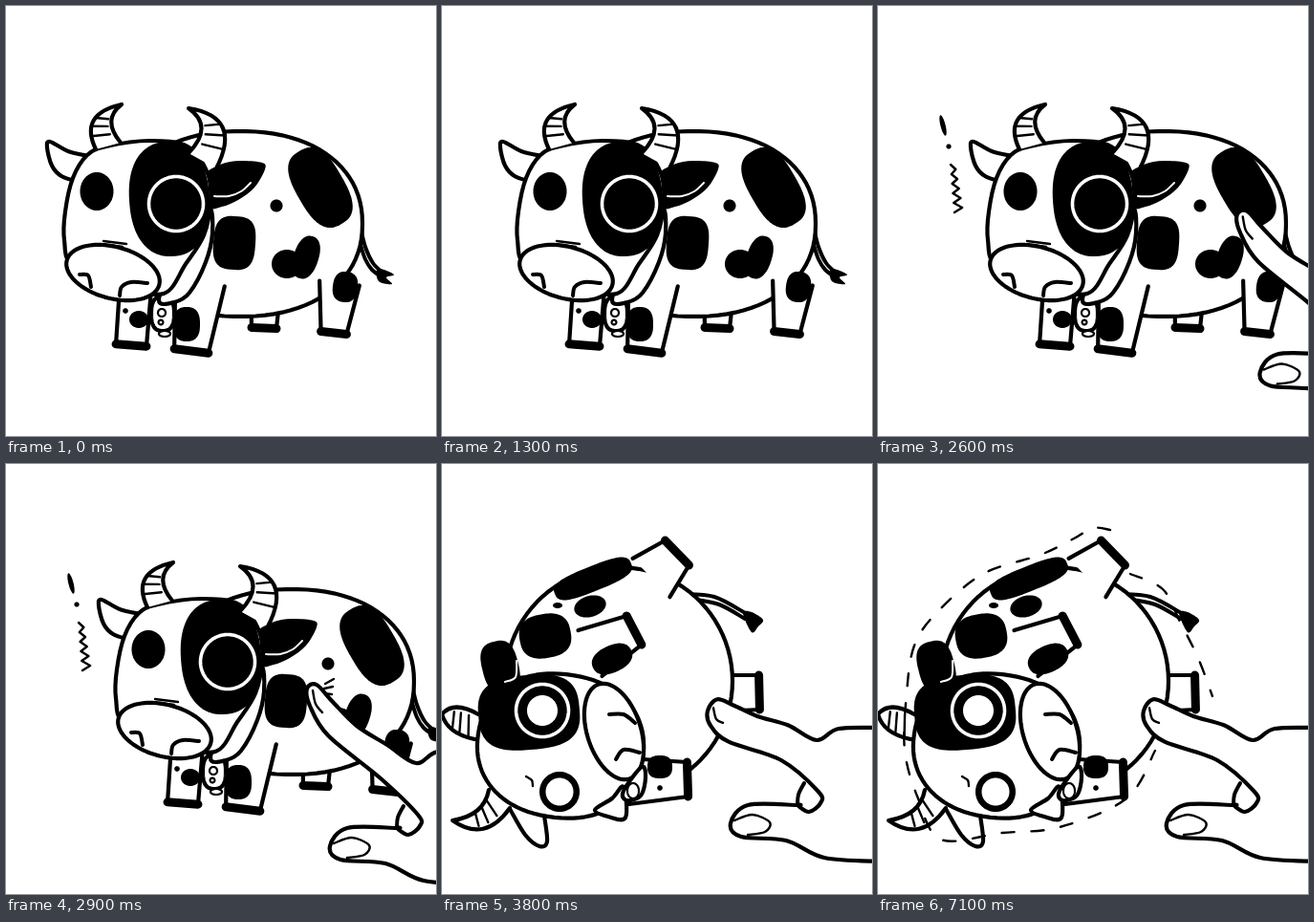
An HTML page with a canvas for the animation above (8000 ms loop, 450x450 px).

```html
<!DOCTYPE html>
<html lang="en">
<head>
<meta charset="utf-8">
<title>Cow poke</title>
<style>
html, body { margin: 0; width: 100%; height: 100%; overflow: hidden; background: #fff; }
canvas { display: block; width: 100vw; height: 100vh; }
</style>
</head>
<body>
<canvas id="stage"></canvas>
<script>
const SIZE = 450, LOOP = 8000;
const canvas = document.getElementById('stage');
const ctx = canvas.getContext('2d');
const ratio = window.devicePixelRatio || 1;
canvas.width = canvas.height = SIZE * ratio;

const mix = (a, b, k) => a + (b - a) * k;
const radians = deg => deg * Math.PI / 180;

const styles = {
  white: { fill: '#fff', stroke: '#000', width: 4.2 },
  black: { fill: '#000' },
  plain: { fill: '#fff' },
  bead: { fill: '#fff', stroke: '#000', width: 2.2 },
  ring: { stroke: '#fff', width: 3.6 },
  glint: { stroke: '#fff', width: 2 },
  line: { stroke: '#000', width: 4 },
  thin: { stroke: '#000', width: 2.4 }
};

function paint(style) {
  const { fill, stroke, width } = styles[style];
  if (fill) { ctx.fillStyle = fill; ctx.fill(); }
  if (stroke) { ctx.strokeStyle = stroke; ctx.lineWidth = width; ctx.stroke(); }
}

// Superellipse: power 2 is an ellipse, higher is squarer.
function blob(style, x, y, rx, ry = rx, deg = 0, power = 2) {
  const bend = v => Math.sign(v) * Math.abs(v) ** (2 / power);
  const cos = Math.cos(radians(deg)), sin = Math.sin(radians(deg));
  ctx.beginPath();
  for (let i = 0; i < 90; i++) {
    const a = i / 45 * Math.PI;
    const u = rx * bend(Math.cos(a)), v = ry * bend(Math.sin(a));
    ctx.lineTo(x + u * cos - v * sin, y + u * sin + v * cos);
  }
  ctx.closePath();
  paint(style);
}

// Smooth curve through key points; a doubled point makes a corner.
function curve(style, text, closed = false, warp = (x, y) => [x, y]) {
  const v = text.split(' ').map(Number);
  const n = v.length / 2;
  const at = i => {
    const k = closed ? (i + n) % n : Math.max(0, Math.min(n - 1, i));
    return warp(v[2 * k], v[2 * k + 1]);
  };
  ctx.beginPath();
  ctx.moveTo(...at(0));
  for (let i = 0; i < (closed ? n : n - 1); i++) {
    const [a, b, c, d] = [at(i - 1), at(i), at(i + 1), at(i + 2)];
    ctx.bezierCurveTo(b[0] + (c[0] - a[0]) / 6, b[1] + (c[1] - a[1]) / 6,
      c[0] - (d[0] - b[0]) / 6, c[1] - (d[1] - b[1]) / 6, c[0], c[1]);
  }
  paint(style);
}

function placed(x, y, deg, cx, cy, draw, stretch = 1) {
  ctx.save();
  ctx.translate(x + cx, y + cy);
  ctx.rotate(radians(deg));
  ctx.scale(stretch, 1);
  ctx.translate(-cx, -cy);
  draw();
  ctx.restore();
}
const shifted = (x, y, draw) => placed(x, y, 0, 0, 0, draw);

// Tapered limb from the body (x1, y1) to a thick black hoof at (x2, y2).
function leg(x1, y1, w1, x2, y2, w2, hoof = 9) {
  const length = Math.hypot(x2 - x1, y2 - y1);
  const px = (y2 - y1) / length / 2, py = (x1 - x2) / length / 2;
  ctx.beginPath();
  ctx.moveTo(x1 + px * w1, y1 + py * w1);
  ctx.lineTo(x2 + px * w2, y2 + py * w2);
  ctx.lineTo(x2 - px * w2, y2 - py * w2);
  ctx.lineTo(x1 - px * w1, y1 - py * w1);
  paint('white');
  ctx.beginPath();
  ctx.moveTo(x2 + px * w2, y2 + py * w2);
  ctx.lineTo(x2 - px * w2, y2 - py * w2);
  ctx.lineWidth = hoof;
  ctx.stroke();
}

// Two bowed edges meeting at the tip, with stripes running across.
function horn(outer, outerBow, tip, innerBow, inner) {
  const along = (base, bow, k) => [0, 1].map(i => mix(mix(base[i], bow[i], k), mix(bow[i], tip[i], k), k));
  ctx.beginPath();
  ctx.moveTo(...outer);
  ctx.quadraticCurveTo(...outerBow, ...tip);
  ctx.quadraticCurveTo(...innerBow, ...inner);
  paint('white');
  for (const k of [0.2, 0.38, 0.56]) {
    const a = along(outer, outerBow, k), b = along(inner, innerBow, k);
    ctx.beginPath();
    ctx.moveTo(...a);
    ctx.lineTo(mix(a[0], b[0], 0.8), mix(a[1], b[1], 0.8));
    paint('thin');
  }
}

function standingBody() {
  curve('line', '371 232 376 252 384 269 394 279');
  curve('line', '371 250 376 265 383 276 394 284');
  curve('black', '389 275 406 281 398 284 404 291 390 288', true);
  leg(271, 314, 29, 270, 337, 26);
  blob('white', 245, 228, 128, 97, 0, 2.2);
  leg(349, 290, 42, 343, 342, 27);
  blob('black', 329, 190, 25, 44, -30, 2.7);
  blob('black', 239, 248, 22, 28, 4, 3);
  blob('black', 283, 209, 6.5);
  blob('black', 294, 270, 16, 15);
  blob('black', 314, 263, 13, 23, 18, 2.3);
  blob('black', 355, 294, 13, 16, 8, 2.5);
}

function standingHead(earAngle) {
  curve('white', '213 212 216 238 209 268 192 300 176 310 160 308 175 270 195 240', true);
  placed(0, 0, earAngle, 80, 170, () =>
    curve('white', '86 157 65 152 46 142 43 148 48 167 58 178 76 184'));
  curve('black', '206 180 224 166 245 162 268 164 271 171 260 190 243 203 226 210 212 210', true);
  curve('glint', '218 199 233 199 246 194 256 185');
  curve('white', '85 156 105 147 150 141 190 147 211 175 214 205 207 240 188 270 165 301 120 292 70 272 61 245 62 215 70 180', true);
  blob('black', 171, 202, 42, 60, -4, 2.3);
  blob('ring', 178, 207, 28.5);
  blob('black', 95, 194, 17.5, 20);
  horn([94, 150], [76, 113], [121, 103], [100, 119], [120, 143]);
  horn([220, 170], [248, 116], [191, 107], [218, 126], [191, 154]);
  blob('white', 112, 279, 50, 27, 15);
  curve('line', '77 281 86 282 89 294');
  curve('line', '119 303 121 294 131 289 148 290');
  curve('thin', '102 246 126 249');
  curve('thin', '107 250 122 252');
}

// lean 0: standing, 1: tipped onto the front legs
function standingCow(lean, earAngle = 0) {
  const dx = 8 * lean, dy = 16 * lean;
  const near = mix(0, 45, lean);
  placed(dx, dy, -12.5 * lean, 95, 194, standingBody, 1 - 0.05 * lean);

  leg(mix(135, 175, lean), 302, 33, mix(131, 178, lean), mix(355, 365, lean), 32);
  blob('black', mix(139, 182, lean), mix(328, 335, lean), 10, 9);
  blob('black', mix(125, 166, lean), mix(319, 328, lean), 2.8);
  leg(mix(203, 243, lean), 290, mix(52, 41, lean), mix(194, 244, lean), 361, mix(36, 41, lean));
  blob('black', 189 + near, 333, 14, 18, 0, 2.6);

  shifted(near * 0.92, near * 0.09, () => {
    blob('white', 164, 322, 12, 18, 0, 2.6);
    blob('bead', 163, 321, 4);
    blob('bead', 162, 331, 2.4);
    blob('bead', 166, 343, 6, 3);
  });
  placed(dx, dy, -14 * lean, 95, 194, () => standingHead(earAngle));
}

function fallenCow(kick, paw) {
  curve('line', '250 136 285 139 319 157');
  curve('line', '260 141 290 147 317 162');
  curve('black', '315 156 324 155 336 163 331 170 324 176', true);
  leg(290, 240, 38, 332, 239, 36);
  blob('white', 185, 227, 119);
  leg(219, 119, 56, ...(kick ? [238, 84] : [246, 93]), 36);
  blob('black', 158, 120, 43, 13, -22, 3);
  blob('black', 108, 180, 27, 23, -10, 2.6);
  blob('black', 155, 149, 17, 11, -16);
  blob('black', 121, 148, 5, 3);
  placed(0, 0, paw, 142, 188, () => {
    leg(155, 198, 54, 201, 174, 34);
    blob('black', 178, 204, 22, 14, -25, 2.3);
  });
  leg(195, 332, 48, 257, 330, 36);
  blob('black', 228, 317, 13, 12, 0, 2.6);
  blob('black', 228, 339, 2.8);

  horn([40, 289], [6, 284], [0, 262], [12, 247], [38, 262]);
  horn([49, 341], [44, 368], [11, 373], [45, 397], [71, 360]);
  curve('white', '71 361 87 388 102 400 110 395 107 368');
  blob('black', 61, 212, 19, 27, -14, 2.8);
  blob('white', 124, 295, 87, 75, 8, 2.2);
  blob('black', 91, 260, 53, 39, -5, 2.9);
  curve('glint', '66 228 77 223 78 206');
  blob('ring', 105, 258, 27.5);
  blob('plain', 105, 258, 16);
  blob('black', 123, 343, 21);
  blob('plain', 123, 343, 14.5);
  curve('thin', '88 327 94 331 95 337');
  blob('white', 180, 280, 52, 28, 72);
  curve('line', '175 262 190 262 202 271');
  curve('line', '182 309 190 299 207 302');

  curve('white', '190 338 178 350 160 362 174 369 192 370', true);
  curve('white', '190 342 209 317 213 328 208 347 193 352', true);
  blob('bead', 200, 342, 6, 8);
}

// curl 0: finger raised, 1: finger lowered
function hand(curl) {
  const droop = (x, y) => [x, y + (x < 392 && y < 330 ? 48 * curl * ((392 - x) / 115) ** 2 : 0)];
  curve('white', '460 276 415 277 392 289 362 270 330 250 305 225 288 207 278 211 281 229 300 260 355 305 394 343 ' +
    '396 355 384 364 372 357 372 357 320 357 302 376 313 390 360 394 400 412 460 416', false, droop);
  curve('line', '372 357 373 346 379 334');
  curve('thin', '306 373 325 367 343 375 338 385 320 388');
  curve('thin', '284 213 287 227 294 236', false, droop);
}

// A jagged sigh that grows upwards.
function cry(full) {
  const turns = full ? 10 : 5;
  ctx.beginPath();
  for (let i = 0; i <= turns; i++) {
    ctx.lineTo(84 - i * 0.6 + (i % 2 ? 5 : -4) * (1 - i / 20), 216 - i * 5);
  }
  paint('thin');
  if (!full) return;
  blob('black', 74, 147, 2.6);
  blob('black', 68, 125, 2.6, 11, -14);
}

function flinch() {
  curve('thin', '40 198 47 215 56 228');
  curve('thin', '48 197 58 212');
  curve('thin', '45 274 50 266 64 265 62 271 54 275 68 275');
  curve('thin', '63 283 67 286 72 279');
}

function touchRays() {
  for (let i = 0; i < 3; i++) {
    curve('thin', `${334 - i} ${230 + i * 5} ${343 - i} ${225 + i * 8}`);
  }
}

function tremble() {
  ctx.setLineDash([13, 18]);
  curve('thin', '243 69 225 67 205 78 170 95 110 115 62 155 38 190 30 240 28 300 42 350 66 393 130 386 190 380 260 350 290 300');
  curve('thin', '264 115 298 131 316 165 335 203 350 243');
  ctx.setLineDash([]);
}

const steps = (t, from, last) => Math.max(0, Math.min(last, Math.floor((t - from) / 100) + 1));
const during = (t, from, length = 100) => t >= from && t < from + length;

function handOffset(t) {
  if (t < 2600) return [118, 2];
  if (t >= 3600) return [0, 0];
  if (t >= 3400) return [18, 11];
  const k = steps(t, 2600, 4) / 4;
  return [mix(118, 37, k), mix(2, 24, k)];
}

function draw(t) {
  ctx.setTransform(ratio, 0, 0, ratio, 0, 0);
  ctx.fillStyle = '#fff';
  ctx.fillRect(0, 0, SIZE, SIZE);
  ctx.lineCap = ctx.lineJoin = 'round';

  if (t < 3600) {
    const lean = t < 3400 ? 0 : 0.5;
    const ear = during(t, 200, 300) ? (steps(t, 200, 3) % 2 ? -24 : 20) : 0;
    shifted(18 * steps(t, 1300, 3) * (1 - lean), 0, () => standingCow(lean, ear));
    if (lean) shifted(14, -2, flinch);
    else if (t >= 2100) cry(t >= 2600);
    if (during(t, 2900, 500)) touchRays();
  } else if (t < 3700) {
    standingCow(1);
    flinch();
  } else if (t < 3800) {
    placed(-30, -25, -48, 210, 270, () => standingCow(1));
  } else {
    fallenCow(during(t, 4800) || during(t, 5400), during(t, 6000) ? 10 : 0);
    if (t >= 7100) tremble();
  }

  if (t >= 2100) shifted(...handOffset(t), () => hand(steps(t, 3700, 2) / 2));
}

const start = performance.now();
function tick() {
  draw((performance.now() - start) % LOOP);
  requestAnimationFrame(tick);
}
tick();
</script>
</body>
</html>
```
